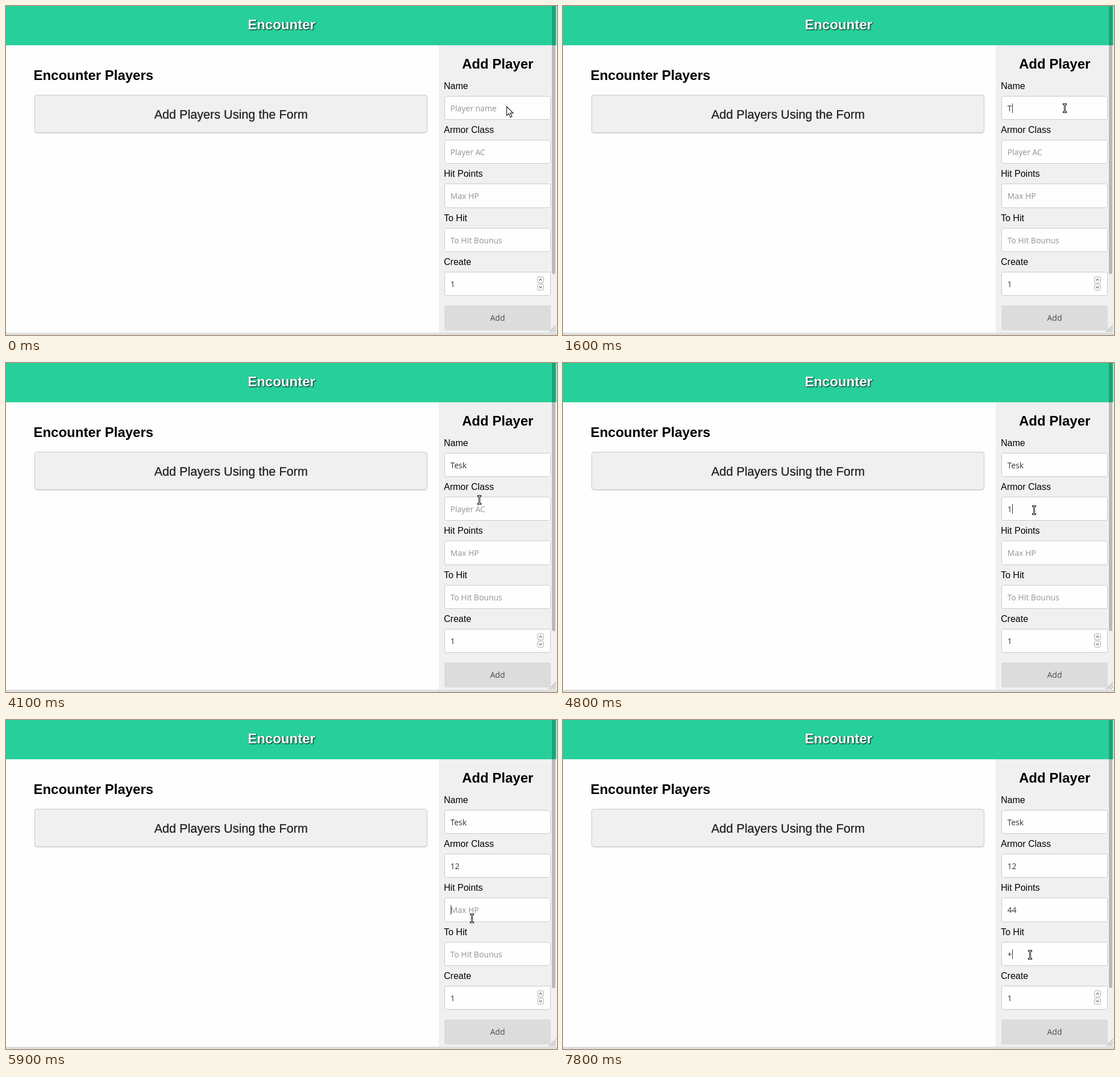
An HTML page with a canvas that plays this animation: 969 by 578 pixels, repeating every 8000 ms.

```html
<!DOCTYPE html>
<html lang="en">
<head>
<meta charset="utf-8">
<title>Encounter</title>
<style>
  html, body { margin: 0; width: 100%; height: 100%; overflow: hidden; background: #fefefe; }
  canvas { display: block; }
</style>
</head>
<body>
<canvas id="stage" width="969" height="578"></canvas>
<script>
const ctx = document.getElementById('stage').getContext('2d');
const LOOP = 8000;
const SANS = '"Liberation Sans", Arial, sans-serif';
const UI = '14px "Open Sans", "Noto Sans", sans-serif';
const HERO = 'Tesk';
const ROW = 77.35;

const fields = [
  { label: 'Name', hint: 'Player name', typed: [[1600, 'T'], [2200, HERO.slice(0, 2)], [3100, HERO.slice(0, 3)], [3500, HERO]] },
  { label: 'Armor Class', hint: 'Player AC', typed: [[4800, '1'], [5000, '12']] },
  { label: 'Hit Points', hint: 'Max HP', typed: [[6100, '4'], [6200, '44']] },
  { label: 'To Hit', hint: 'To Hit Bounus', typed: [[7800, '+']] },
  { label: 'Create', hint: '', typed: [[0, '1']] }
];

// [time, index of the field showing a caret, or -1]
const carets = [
  [0, -1], [600, 0], [1700, -1], [2200, 0], [2900, -1], [3100, 0], [4000, -1],
  [4800, 1], [5900, 2], [6800, -1], [7200, 3]
];

// [time, shape, x, y]
const pointer = [
  [0, 'arrow', 880, 176], [500, 'beam', 882, 179],
  [4000, 'beam', 858, 208], [4100, 'beam', 832, 240], [4300, 'beam', 830, 250], [4400, 'beam', 828, 258],
  [5400, 'beam', 827, 270], [5500, 'beam', 824, 298], [5600, 'beam', 821, 330], [5700, 'beam', 819, 348],
  [6700, 'arrow', 816, 345], [6800, 'arrow', 817, 362], [6900, 'beam', 820, 399], [7000, 'beam', 821, 412]
];

function latest(steps, t) {
  let found = null;
  for (const step of steps) if (step[0] <= t) found = step;
  return found;
}

function rect(x, y, w, h, color) {
  ctx.fillStyle = color;
  ctx.fillRect(x, y, w, h);
}

function panel(x, y, w, h, r, fill, border) {
  ctx.beginPath();
  ctx.roundRect(x + 0.5, y + 0.5, w - 1, h - 1, r);
  ctx.fillStyle = fill;
  ctx.fill();
  ctx.lineWidth = 1;
  ctx.strokeStyle = border;
  ctx.stroke();
}

function text(str, x, y, font, color, align = 'left') {
  ctx.font = font;
  ctx.textAlign = align;
  ctx.fillStyle = color;
  ctx.fillText(str, x, y);
}

function line(points, color, width) {
  ctx.beginPath();
  points.forEach(([x, y]) => ctx.lineTo(x, y));
  ctx.strokeStyle = color;
  ctx.lineWidth = width;
  ctx.stroke();
}

function shadow(color, blur, offset) {
  ctx.shadowColor = color;
  ctx.shadowBlur = blur;
  ctx.shadowOffsetX = ctx.shadowOffsetY = offset;
}

function drawPage() {
  rect(0, 0, 969, 578, '#fefefe');
  rect(761, 69, 208, 505, '#f0f0f0');
  rect(0, 0, 968, 69, '#27d09a');

  ctx.save();
  shadow('#000', 2, 1);
  text('Encounter', 484.5, 41, `bold 24px ${SANS}`, '#fff', 'center');
  ctx.restore();

  text('Encounter Players', 48.4, 130, `bold 24px ${SANS}`, '#000');
  panel(50, 156, 691, 68, 4, '#f0f0f0', '#dcdcdc');
  panel(50, 156, 691, 67, 4, '#f0f0f0', '#c8c8c8');
  ctx.save();
  shadow('rgba(0,0,0,.6)', 1, 0);
  text('Add Players Using the Form', 395.7, 198, `21.6px ${SANS}`, '#222', 'center');
  ctx.restore();

  text('Add Player', 864.7, 110, `bold 24px ${SANS}`, '#000', 'center');
}

function drawField(field, i, t, focused) {
  const top = Math.round(157.6 + ROW * i);
  const bottom = Math.round(200 + ROW * i);
  const step = latest(field.typed, t);
  const value = step ? step[1] : '';
  text(field.label, 770, top - 12, `16px ${SANS}`, '#000');
  panel(771, top, 187, bottom - top, 3, '#fefefe', '#c9c9c9');
  text(value || field.hint, 781.5, top + 27, UI, value ? '#333' : '#939393');
  if (focused) {
    const x = 782 + Math.round(ctx.measureText(value).width);
    rect(x, top + 13, 1, 17, '#333');
  }
}

function drawSpinner() {
  for (const [y, dir] of [[475, -1], [488, 1]]) {
    panel(934, y, 12, 12, 3, '#f6f6f6', '#b0b0b0');
    const mid = y + 6;
    line([[937.5, mid - dir * 1.5], [940, mid + dir * 1.5], [942.5, mid - dir * 1.5]], '#555', 1.1);
  }
}

function drawChrome() {
  ctx.beginPath();
  ctx.roundRect(960, -4, 6, 475, 3);
  ctx.fillStyle = 'rgba(0,0,0,.23)';
  ctx.fill();
  rect(0, 574, 969, 4, '#dedede');
  for (const d of [12, 8, 4]) line([[967 - d, 573], [967, 573 - d]], '#888', 1);
}

function drawArrow(x, y) {
  const shape = [[0, 0], [0, 16], [3.8, 12.6], [6.5, 19], [9.2, 17.8], [6.5, 11.6], [11.3, 11.6]];
  ctx.beginPath();
  shape.forEach(([dx, dy]) => ctx.lineTo(x + dx + 0.5, y + dy + 0.5));
  ctx.closePath();
  ctx.fillStyle = '#fff';
  ctx.fill();
  ctx.strokeStyle = '#222';
  ctx.lineWidth = 1.2;
  ctx.stroke();
}

function drawBeam(x, y) {
  for (const [pad, color] of [[1, '#111'], [0, '#fff']]) {
    for (const dy of [-7, 7]) rect(x - 2 - pad, y + dy - pad, 5 + 2 * pad, 1 + 2 * pad, color);
    rect(x - pad, y - 7, 1 + 2 * pad, 15, color);
  }
}

function draw(t) {
  drawPage();
  const focus = latest(carets, t)[1];
  fields.forEach((field, i) => drawField(field, i, t, i === focus));
  drawSpinner();
  ctx.beginPath();
  ctx.roundRect(771, 526, 187, 44, 3);
  ctx.fillStyle = '#dcdcdc';
  ctx.fill();
  text('Add', 864.5, 553, UI, '#4a4a4a', 'center');
  drawChrome();
  const [, shape, x, y] = latest(pointer, t);
  (shape === 'arrow' ? drawArrow : drawBeam)(x, y);
}

const start = performance.now();
function tick() {
  draw((performance.now() - start) % LOOP);
  requestAnimationFrame(tick);
}
tick();
</script>
</body>
</html>
```
